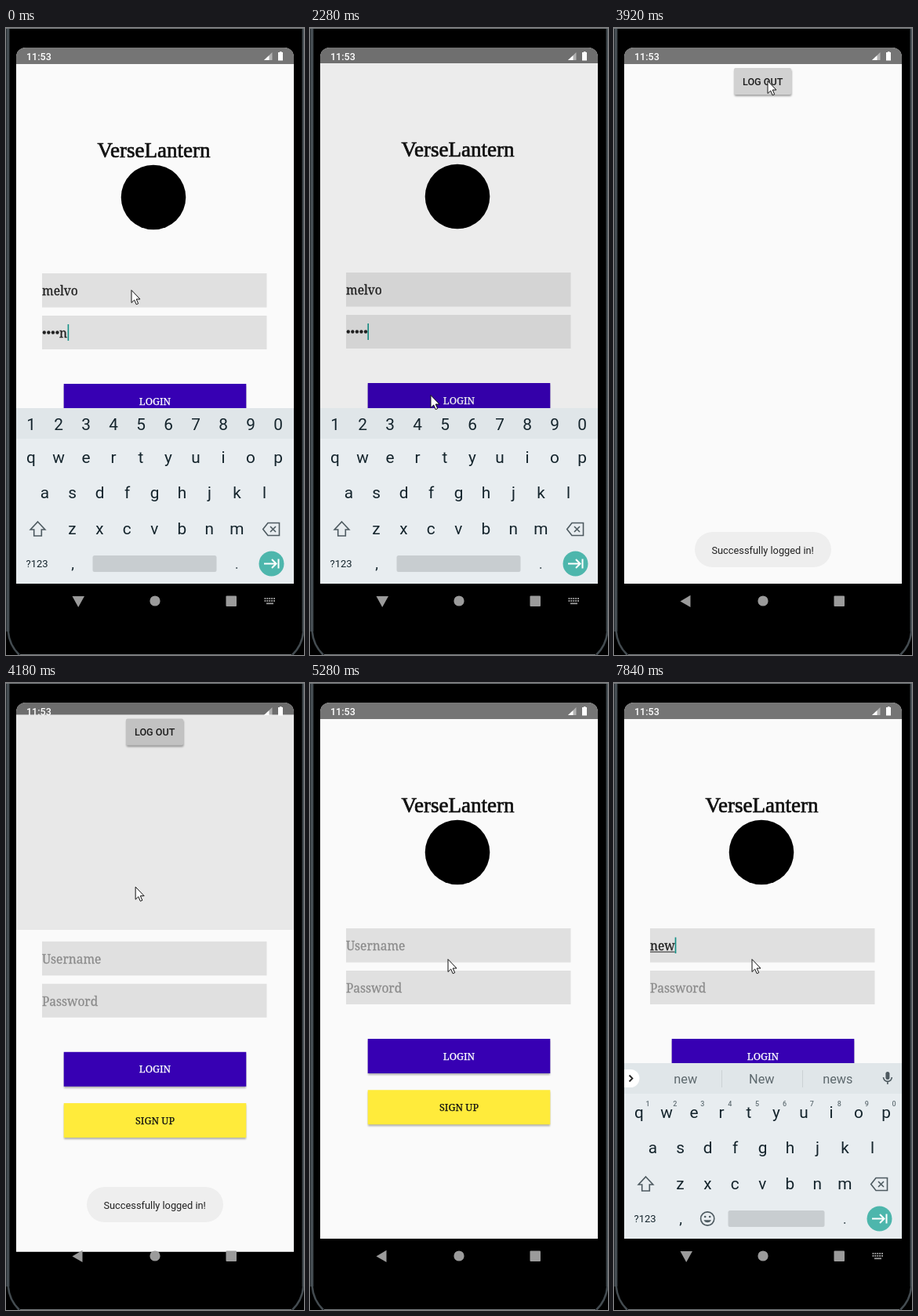
An HTML page that plays this animation: 380x800 px, repeating every 8000 ms.

```html
<!DOCTYPE html>
<html lang="en">
<head>
<meta charset="utf-8">
<title>Login demo</title>
<style>
  html, body { margin: 0; width: 100%; height: 100%; overflow: hidden; background: #000; }
  svg { display: block; width: 100%; height: 100%; }
</style>
</head>
<body>
<svg id="stage" viewBox="0 0 380 800" xmlns="http://www.w3.org/2000/svg"></svg>
<script>
const LOOP = 8000;
const SANS = 'Roboto, sans-serif';
const SLAB = "'Noto Serif', serif";
const TEAL = '#159187';
const stage = document.getElementById('stage');
const pen = document.createElement('canvas').getContext('2d');

const bursts = [[0, 0, 1], [530, 1480, 7], [2020, 2280, 3], [2400, 2550, 2], [2820, 2820, 1],
  [3090, 3920, 7], [4180, 4180, 1], [4330, 4330, 1], [4460, 5130, 6], [5280, 5700, 4],
  [5830, 5980, 2], [6440, 7000, 2], [7550, 7840, 3]];
const ticks = bursts.flatMap(([a, b, n]) =>
  Array.from({ length: n }, (_, i) => n > 1 ? a + (b - a) * i / (n - 1) : a));

const clamp = v => Math.max(0, Math.min(1, v));
const within = (t, a, b) => t >= a && t < b;
const slabWidth = s => {
  pen.font = '15.5px ' + SLAB;
  return pen.measureText(s).width;
};

const rect = (x, y, w, h, fill, more = '') =>
  `<rect x="${x}" y="${y}" width="${w}" height="${h}" fill="${fill}" ${more}/>`;
const circle = (x, y, r, fill, more = '') =>
  `<circle cx="${x}" cy="${y}" r="${r}" fill="${fill}" ${more}/>`;
const path = (d, fill, more = '') => `<path d="${d}" fill="${fill}" ${more}/>`;
const line = (d, color, w) => path(d, 'none', `stroke="${color}" stroke-width="${w}"`);
const group = (more, body) => `<g ${more}>${body}</g>`;
const text = (x, y, s, size, fill, more = '', font = SANS) =>
  `<text x="${x}" y="${y}" font-size="${size}" fill="${fill}" font-family="${font}" ${more}>${s}</text>`;
const mid = (x, y, s, size, fill, more = '', font = SANS) =>
  text(x, y, s, size, fill, 'text-anchor="middle" ' + more, font);
const slab = (x, y, s, fill) =>
  text(x, y, s, 15.5, fill, `stroke="${fill}" stroke-width=".3"`, SLAB);

const defs = `<defs>
  <clipPath id="screen"><path d="M13 800V37a12 12 0 0 1 12-12H355a12 12 0 0 1 12 12V800Z"/></clipPath>
  <linearGradient id="edge"><stop offset="0" stop-color="#22282c"/><stop offset=".55" stop-color="#555e64"/>
    <stop offset="1" stop-color="#0c0f11"/></linearGradient>
  <filter id="soft" x="-10%" y="-30%" width="120%" height="170%"><feGaussianBlur stdDeviation="1.2"/></filter>
</defs>`;

const side = rect(0, 0, 5, 770, 'url(#edge)') + line('M2.8 770Q4 787 17 800', '#434b50', 2.6);
const device = rect(0, 0, 380, 800, '#000') + side +
  group('transform="translate(382 0) scale(-1 1)"', side) +
  line('M0 .5H380M18 799.5H364', '#74797c', 1);

const statusIcons = text(26, 40.5, '11:53', 12.5, '#fff', 'font-weight="500"') +
  path('M339.5 31V41H329Z', '#fff', 'opacity=".45"') +
  path('M335.5 35V41H329Z', '#fff') +
  path('M349 30H351.5V31H353V41.5H347V31H349Z', '#fff');

const shell = rect(13, 25, 354, 684, '#fafafa') + rect(13, 25, 354, 21, '#757575');

function button(y, fill, label, color) {
  return rect(74, y + 2, 232, 44, '#000', 'opacity=".3" filter="url(#soft)"') +
    rect(73.7, y, 232.6, 44, fill) +
    mid(190, y + 26.6, label, 12.6, color, `stroke="${color}" stroke-width=".25"`, SLAB);
}

function secret(t) {
  const masked = t >= 1000, n = masked ? 5 : 4;
  let s = '';
  for (let i = 0; i < n; i++) s += circle(48.8 + i * 5.55, 388.5, 2.2, '#222');
  if (!masked) s += slab(68, 395, 'n', '#222');
  const off = within(t, 530, 1000) || within(t, 1480, 2020);
  return s + (off ? '' : rect(masked ? 73.4 : 78.6, 378, 1.6, 21, TEAL));
}

function username(t) {
  if (t < 4000) return slab(46, 341, 'melvo', '#222');
  const typed = 'new'.slice(0, t < 7550 ? 0 : t < 7690 ? 1 : t < 7840 ? 2 : 3);
  const w = slabWidth(typed);
  const lit = within(t, 5400, 5980) || within(t, 6440, 7000) || t >= 7550;
  return (typed ? slab(46, 341, typed, '#222') + rect(46, 342.6, w, 1, '#222')
                : slab(46, 341, 'Username', '#8c8c8c')) +
    (lit ? rect(46 + w, 324.5, 1.7, 20.5, TEAL) : '');
}

function loginPage(t) {
  return shell +
    mid(188.5, 165, 'VerseLantern', 27, '#111', 'stroke="#111" stroke-width=".7"', "'Liberation Serif', serif") +
    circle(188, 216, 41.3, '#000') +
    rect(46, 313, 286.5, 43.5, '#e0e0e0') + rect(46, 367, 286.5, 43, '#e0e0e0') +
    username(t) +
    (t < 4000 ? secret(t) : slab(46, 395, 'Password', '#8c8c8c')) +
    button(454, '#3700b3', 'LOGIN', '#fff') + button(519.3, '#ffeb3b', 'SIGN UP', '#111');
}

function homePage(t) {
  const down = t >= 3640;
  return shell +
    rect(153.5, down ? 53 : 52, 73, 34, '#000', `rx="2" opacity="${down ? .35 : .22}" filter="url(#soft)"`) +
    rect(153, 51, 73, 34, down ? '#d1d1d1' : '#d6d6d6', 'rx="2"') +
    mid(189.7, 73, 'LOG OUT', 12.6, '#1d1d1d', 'font-weight="500"');
}

// The old page dims first, then the new one slides up, uncovered from the bottom.
function open(t, start, from, to) {
  const u = t - start;
  if (u < 0) return from(t);
  if (u > 500) return to(t);
  const rest = Math.exp(-u / 83), shift = 27.5 * rest;
  const top = 25 + shift + 655 * rest ** 1.77;
  const old = group(`transform="translate(0 ${-14.3 * (1 - rest)})"`,
    from(t) + rect(13, 25, 354, 684, '#000', `opacity="${.1 - .05 * rest}"`));
  if (u < 30) return old;
  return old +
    `<clipPath id="cut"><rect y="${top}" width="380" height="800"/></clipPath>` +
    group('clip-path="url(#cut)"', group(`transform="translate(0 ${shift})"`, to(t)));
}

function words(t) {
  if (t < 7550) return ['thanks', 'I', 'we'];
  if (t < 7690) return ['n', 'N', 'now'];
  return t < 7840 ? ['ne', 'new', 'need'] : ['new', 'New', 'news'];
}

function suggestions(t) {
  return path('M13 493H21a11.5 11.5 0 0 1 0 23H13Z', '#fff') +
    line('M19.5 500.5L23.5 504.5L19.5 508.5', '#222', 1.8) +
    words(t).map((w, i) => mid(91.3 + 97 * i, 511, w, 16.3, '#5d686d')).join('') +
    line('M137.5 494V516M240.5 494V516', '#cbd1d4', 1) +
    rect(346.4, 496, 5, 10, '#4d595f', 'rx="2.5"') +
    line('M343.5 503a5.4 5.4 0 0 0 10.8 0M348.9 508.5V512', '#4d595f', 1.6);
}

function keyboard(t) {
  const ink = '#14242c', icon = '#4d5a60', late = t > 4000;
  const row = (s, x, y) => [...s].map((c, i) => mid(x + 35 * i, y, c, 20.8, ink)).join('');
  const space = late ? 145.5 : 110.5;
  return rect(13, 485, 354, 224, '#e8edf0') + rect(13, 485, 354, 39, '#e0e6e9') +
    (late
      ? suggestions(t) + [...'1234567890'].map((c, i) =>
          mid(43 + 34.9 * i, 540, c, 9, '#647177', 'font-weight="500"')).join('')
      : row('1234567890', 32, 513)) +
    row('qwertyuiop', 32, 554.5) + row('asdfghjkl', 49.5, 600) + row('zxcvbnm', 84.3, 645.5) +
    line('M40.5 630L49.8 640H45.3V648H35.7V640H31.2Z', icon, 1.6) +
    line('M334 631.5H348.5V647.5H334L327.7 639.5ZM337 636L344 643M344 636L337 643', icon, 1.6) +
    text(25.5, 688, '?123', 13, ink) + mid(85, 690, ',', 19, ink) + mid(294.3, 690, '.', 19, icon) +
    rect(space, 673, 268.5 - space, 21, '#c8cdd0', 'rx="2.5"') +
    (late ? circle(119.2, 683.5, 8.6, 'none', `stroke="${icon}" stroke-width="1.6"`) +
      circle(116.2, 681, 1.3, icon) + circle(122.2, 681, 1.3, icon) +
      path('M114.5 685.3H124a5 4.4 0 0 1-9.5 0Z', icon) : '') +
    circle(338.5, 683.5, 16, '#4db6ac') +
    line('M329 683.5H344M339 678L344.5 683.5L339 689M347.5 677.5V689.5', '#fff', 2);
}

// Shown part of the keyboard, 0 to 1.
const keysShown = t => t < 4000 ? 1 - clamp((t - 2340) / 160) : clamp((t - 5330) / 300);

function navBar(k) {
  const grey = '#9b9b9b';
  let s = circle(190, 731, 6.6, grey) + rect(280.5, 724.5, 13.5, 13.5, grey, 'rx="1"');
  if (k < .3) return s + path('M97.5 723.8V739L84.5 731.4Z', grey);
  s += path('M84.5 725H100L92.2 739Z', grey);
  for (let i = 0; i < 10; i++) s += rect(329.5 + i % 5 * 2.9, 727 + (i / 5 | 0) * 3, 1.9, 1.9, grey);
  return s + rect(332, 733.4, 9, 1.8, grey);
}

function toast(t) {
  const a = t < 4000 ? clamp((t - 2450) / 200) : clamp((4460 - t) / 260);
  return group(`opacity="${a}"`, rect(103, 643, 174, 45, '#eee', 'rx="22.5"') +
    mid(189.7, 670.5, 'Successfully logged in!', 12.8, '#222'));
}

// Pointer way points: time, x, y.
const trail = [[430, 159.5, 334], [1480, 153.5, 468], [3000, 212, 27], [3640, 195.5, 67],
  [4060, 195.5, 67], [4330, 121.5, 529], [4420, 121.5, 529], [5130, 175.5, 352]];

function pointer(t) {
  if (within(t, 2500, 3000)) return '';
  let i = trail.findIndex(p => p[0] > t);
  if (i < 0) i = trail.length;
  const a = trail[Math.max(0, i - 1)];
  const b = t < 2500 && i > 1 ? a : trail[Math.min(i, trail.length - 1)];
  const k = clamp((t - a[0]) / (b[0] - a[0] || 1)), e = k * k * (3 - 2 * k);
  const x = a[1] + (b[1] - a[1]) * e, y = a[2] + (b[2] - a[2]) * e;
  return path('M.5 .5V16.5L4.2 13L6.7 18.7L9.2 17.6L6.7 12H11.5Z', '#fff',
    `stroke="#111" stroke-width="1" transform="translate(${x} ${y})"`);
}

function draw(t) {
  const k = keysShown(t);
  const pages = t < 3500 ? open(t, 2274, loginPage, homePage) : open(t, 4139, homePage, loginPage);
  const drop = (1 - k) * (t < 4000 ? 115 : 40);
  stage.innerHTML = defs + device +
    group('clip-path="url(#screen)"', pages +
      (k ? group(`opacity="${k}" transform="translate(0 ${drop})"`, keyboard(t)) : '')) +
    statusIcons + navBar(k) + toast(t) + pointer(t);
}

let shown = -1;
function frame(now) {
  const t = now % LOOP;
  const tick = ticks.filter(v => v <= t + .5).pop();
  if (tick !== shown) draw(shown = tick);
  requestAnimationFrame(frame);
}
frame(0);
</script>
</body>
</html>
```
